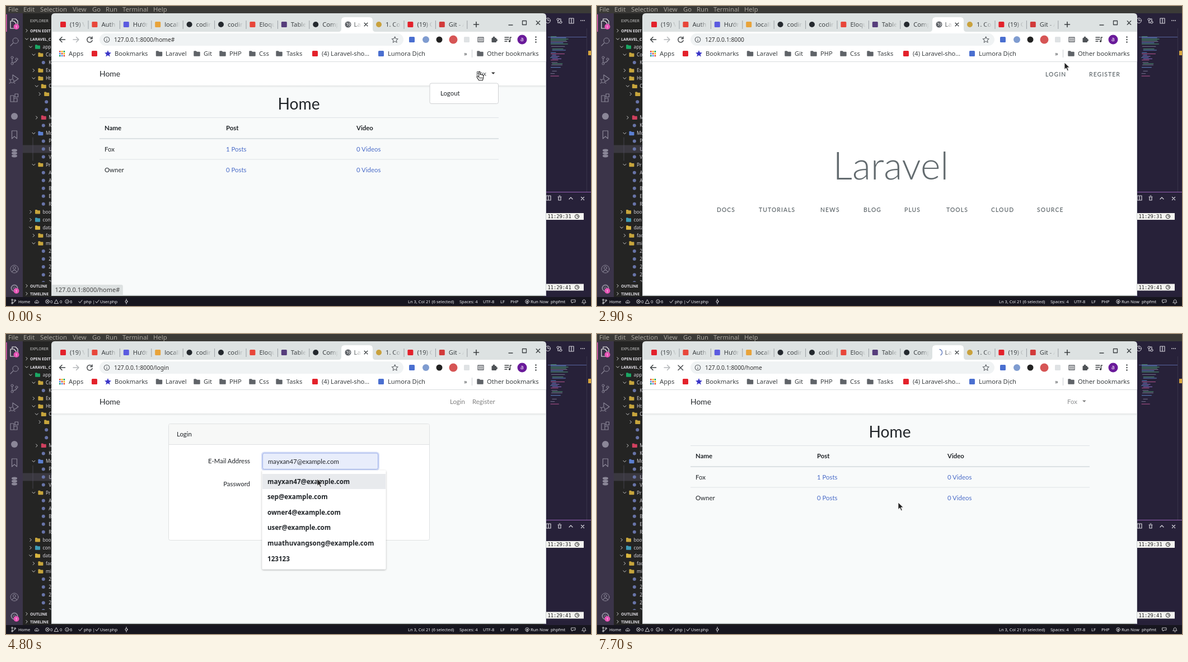
An HTML page that plays this animation: 1045x536 px, repeating every 8000 ms.

```html
<!DOCTYPE html>
<html lang="en">
<head>
<meta charset="utf-8">
<title>Login flow</title>
<style>
  html, body { margin: 0; width: 100%; height: 100%; overflow: hidden; background: #24242a; }
  svg { display: block; }
  #stage { width: 100vw; height: 100vh; }
  text { white-space: pre; font-family: "Noto Sans", "Open Sans", sans-serif; }
  .page text { font-family: Lato, "Open Sans", sans-serif; font-size: 11.4px; fill: #212529; }
  .page .link { fill: #4a6cc8; }
  .page .mute { fill: #808080; }
  .page .light { fill: #fff; }
  .page .caps { font-size: 10.4px; font-weight: 600; letter-spacing: 1.05px; fill: #636b6f; }
  .mono { font-family: "DejaVu Sans Mono", monospace; }
  .line { fill: none; stroke-linecap: round; stroke-linejoin: round; }
  .field { fill: #fff; stroke: #c9d0d6; stroke-width: 1; }
  .field.filled { fill: #e8edfb; }
  .field.focus { stroke: #a1b3ea; }
  .glow { fill: none; stroke: #4c6fd9; stroke-opacity: .25; stroke-width: 2.6; }
</style>
</head>
<body>
<svg id="stage" viewBox="0 0 1045 536">
  <defs>
    <linearGradient id="fade"><stop stop-color="#dde2e2" stop-opacity="0"/><stop offset="1" stop-color="#dde2e2"/></linearGradient>
    <linearGradient id="fadeOn"><stop stop-color="#fff" stop-opacity="0"/><stop offset="1" stop-color="#fff"/></linearGradient>
    <linearGradient id="drop" x2="0" y2="1"><stop stop-opacity=".09"/><stop offset="1" stop-opacity="0"/></linearGradient>
    <filter id="soft" x="-10%" y="-10%" width="120%" height="120%"><feDropShadow dx="0" dy="1" stdDeviation="1.5" flood-opacity=".35"/></filter>
  </defs>

  <g id="editor"></g>

  <g id="browser">
    <path d="M81 518V19q0-6 6-6H959q6 0 6 6V518z" fill="#dde2e2"/>
    <path d="M594 46q5 0 5-5V26q0-6 6-6H649q6 0 6 6V41q0 5 5 5z" fill="#fff"/>
    <rect x="82" y="46" width="883" height="53" fill="#fff"/>
    <rect x="167" y="49" width="543" height="22" rx="11" fill="#f0f3f4"/>
    <g id="chrome"></g>
    <text id="url" x="193" y="64" font-size="10.3" fill="#333"></text>
    <g id="globe"><circle cx="611" cy="33" r="5.5" fill="#5f6368"/>
      <path class="line" d="M608.500 30.500l2.500 1 .5 1.500-2 1.500M613 30l1.500 1.500-.5 3-1.500 1.500" stroke="#fff"/></g>
    <path id="spinner" class="line" d="M612 27.5a5.6 5.6 0 0 1 2 10.2" stroke="#6f86c4" stroke-width="1.5"/>
    <path id="reload" class="line" d="M153.4 57.5a4.7 4.7 0 1 0 .7 4M154 55v3.4h-3.4" stroke="#4a4d50" stroke-width="1.5"/>
    <path id="stop" class="line" d="M145 56l8.5 8.5M153.5 56l-8.5 8.5" stroke="#4a4d50" stroke-width="1.5"/>
  </g>

  <rect x="82" y="99" width="883" height="1" fill="#d8dcdf"/>
  <g class="page">
    <rect x="82" y="100" width="883" height="416" fill="#f8fafa"/>
    <g id="navbar">
      <rect x="82" y="142" width="883" height="4" fill="url(#drop)"/>
      <rect x="82" y="100" width="883" height="42" fill="#fff"/>
      <text x="167" y="126" style="font-size:13.9px">Home</text>
    </g>

    <g id="home">
      <g id="user"><text x="840" y="125">Fox</text><path d="M867 118.5h6.6l-3.3 3.4z"/></g>
      <text x="523" y="185" text-anchor="middle" style="font-size:28.2px">Home</text>
      <path d="M167 199.5H880M167 274H880" stroke="#dee2e6"/>
      <path d="M167 237H880" stroke="#d3d8dc" stroke-width="1.6"/>
      <g id="table"></g>
      <g id="menu">
        <rect x="757" y="138" width="122.5" height="36.5" rx="3" fill="#fff" stroke="#cfd1d3"/>
        <rect id="menuHover" x="757.5" y="144" width="121.5" height="24" fill="#4b6fd9"/>
        <text id="logout" x="776" y="160">Logout</text>
      </g>
    </g>

    <g id="welcome">
      <rect x="82" y="100" width="883" height="416" fill="#fff"/>
      <text x="525" y="309.5" text-anchor="middle" style="font-size:68px;font-weight:300;fill:#636b6f">Laravel</text>
      <g id="links"></g>
    </g>

    <g id="login">
      <text class="mute" x="793" y="125">Login</text><text class="mute" x="833" y="125">Register</text>
      <rect x="290.5" y="160.5" width="466" height="208" rx="3" fill="#fff" stroke="#dfe1e2"/>
      <path d="M291 197V164q0-3 3-3H753q3 0 3 3V197z" fill="#f7f8f7"/>
      <path d="M291 197.5H756" stroke="#dfe1e2"/>
      <text x="305" y="183">Login</text>
      <text x="436" y="231" text-anchor="end">E-Mail Address</text>
      <text x="436" y="272" text-anchor="end">Password</text>
      <rect id="mailGlow" class="glow" x="457.3" y="211.8" width="208.4" height="31" rx="4"/>
      <rect id="mail" class="field" x="458.5" y="213" width="206" height="28.5" rx="3"/>
      <text id="mailText" x="468" y="232">mayxan47@example.com</text>
      <rect id="passGlow" class="glow" x="457.3" y="252.7" width="208.4" height="31" rx="4"/>
      <rect id="pass" class="field" x="458.5" y="254" width="206" height="28.5" rx="3"/>
      <g id="dots"></g>
      <rect id="caret" width="1" height="15" fill="#222"/>
      <rect x="459" y="299" width="9" height="9" rx="1.5" fill="#fff" stroke="#767676"/>
      <text x="474" y="307">Remember Me</text>
      <rect id="buttonGlow" class="glow" x="457" y="323" width="50" height="31" rx="4"/>
      <rect x="458" y="324" width="48" height="29" rx="3" fill="#4b6fd9"/>
      <text class="light" x="468" y="342">Login</text>
      <text class="link" x="518.5" y="342">Forgot Your Password?</text>
      <g id="popup">
        <rect x="457.5" y="243.5" width="221" height="177" rx="2" fill="#fff" filter="url(#soft)"/>
        <rect id="choice" x="458" y="250" width="220" height="27" fill="#e8eaed"/>
      </g>
    </g>
  </g>

  <g id="status">
    <path id="bubble" fill="#dde1e1"/>
    <text id="statusText" x="87.5" y="510.5" font-size="11" fill="#444"></text>
  </g>
  <path d="M81.5 99V517.5H964.5V99" fill="none" stroke="#cfd4d6"/>

  <g id="hand"><path d="M-2.4-6.5q0-1.4 1.2-1.4t1.2 1.4v4q1.2-.8 2.1.3 1.2-.6 2 .5 1.7-.3 1.7 1.5v3.4L4.4 7.8H-2.2L-5.6 2.6q-.9-1.7.5-2.1 1.2-.2 2.7 1.6z" fill="#fff" stroke="#222" stroke-width="1.1"/><path d="M-.6 2v3M1.5 2v3M3.6 2v3" stroke="#222" stroke-width=".8"/></g>
  <path id="arrow" d="M0 0V12.4l3-2.7 2.3 5 2-.9-2.2-4.9h4.2z" fill="#222" stroke="#fff" stroke-width=".8"/>
  <path id="beam" class="line" d="M-2.5-6q2 0 2.5 1 .5-1 2.5-1M0-5V5M-2.5 6q2 0 2.5-1 .5 1 2.5 1" stroke="#222" stroke-width="1.2"/>
</svg>

<script>
const $ = id => document.getElementById(id);
const add = (id, ...parts) => $(id).insertAdjacentHTML('beforeend', parts.flat().join(''));
const text = (x, y, label, size, fill, extra = '') =>
  `<text x="${x}" y="${y}" font-size="${size}" fill="${fill}" ${extra}>${label}</text>`;
const line = (d, stroke, width = 1.2) => `<path class="line" d="${d}" stroke="${stroke}" stroke-width="${width}"/>`;
const rect = (x, y, w, h, fill, r = 0) => `<rect x="${x}" y="${y}" width="${w}" height="${h}" rx="${r}" fill="${fill}"/>`;
const dot = (x, y, r, fill) => `<circle cx="${x}" cy="${y}" r="${r}" fill="${fill}"/>`;
const ring = (x, y, r, stroke, w = 1) => `<circle class="line" cx="${x}" cy="${y}" r="${r}" stroke="${stroke}" stroke-width="${w}"/>`;
const folder = (x, y, s, fill) =>
  `<path transform="translate(${x} ${y}) scale(${s})" d="M-6-4q0-1 1-1h3.6l1.4 1.6H5q1 0 1 1V4q0 1-1 1H-5q-1 0-1-1z" fill="${fill}"/>`;
const cross = (x, y, r, color, w) => line(`M${x - r} ${y - r}l${2 * r} ${2 * r}M${x + r} ${y - r}l${-2 * r} ${2 * r}`, color, w);
const bold = 'font-weight="700"';
const sidebar = '#242423';

function drawEditor() {
  add('editor', rect(0, 0, 1045, 536, sidebar), rect(960, 13, 85, 508, '#272139'),
    rect(0, 0, 1045, 13, '#3b3a37'), rect(0, 13, 30, 508, '#3b3449'), rect(0, 520, 1045, 16, '#17161f'));
  const menu = { File: 4, Edit: 31, Selection: 61, View: 119, Go: 154, Run: 178, Terminal: 208, Help: 263 };
  add('editor', Object.entries(menu).map(([label, x]) => text(x, 10, label, 11.3, '#aaa69e')));

  // activity bar
  const dim = '#8b8798';
  add('editor', rect(0, 15, 1.5, 31, '#e05cb0'),
    line('M11 26V23h6l4 4v9h-3M8 27h6l4 4v9H8z', '#eee'),
    ring(17, 62, 5, dim), line('M13 66l-5 5', dim),
    ring(11, 92, 2, dim), ring(11, 103, 2, dim), ring(19, 95, 2, dim), line('M11 94v7M19 97q0 3-6 4', dim),
    line('M12 130v-7l10 7-7 5', dim), ring(11, 134, 3.3, dim), line('M6 131l2 1M6 138l2-1M16 138l-2-1', dim),
    line('M8 160h6v11H8zM14 165h6v6H8v-6M16 157h5.500v5.500H16z', dim),
    dot(15, 197, 6, dim), line('M10.500 223h9v14l-4.500-4-4.500 4z', dim),
    [258, 263, 268].map(y => `<ellipse cx="15" cy="${y}" rx="5" ry="2.4" fill="${dim}"/>`),
    ring(15, 470, 7, dim), ring(15, 468, 2.5, dim), line('M10.500 475q4.500-6 9 0', dim),
    ring(15, 504, 5.5, dim, 2), ring(15, 504, 2, dim),
    [37, 509].map(y => dot(18.5, y, 5, '#e653b5') + text(16.8, y + 2.6, '1', 6.5, '#fff')));

  // file tree: depth, marker (v open, > closed, . file), label, folder colour
  const gold = '#c7a53c';
  const tree = `0vapp#1ba764 1vCo 2.K 1>Ex 1vHt 2vC 3> 3. 3. 2>M#d0405e 2.K 1vMo#5b7fd0 2.P 2.U 2.V 1vPr
    2.A 2.A 2.B 2.E 2.R 0>boo 0>con#3e9bb5 0vdata#d9b640 1>fac 1vmi 2.2 2.2 2.2 2.2 2.2`.split(/\s+/);
  const chevron = (x, y, open) => line(open ? `M${x - 2.5} ${y - 1.2}l2.500 2.500 2.500-2.500` : `M${x - 1.2} ${y - 2.5}l2.500 2.500-2.500 2.500`, '#ccc', 1);
  add('editor', rect(30, 248.500, 51, 14, '#3a3840'), line('M48 235V276', '#55515f', .7));
  tree.forEach((entry, i) => {
    const [, depth, kind, label, color = gold] = entry.match(/(\d)(.)(\w*)(#\w+)?/);
    const y = 73 + 14.04 * i, x = 44 + 5.4 * depth;
    const isFile = kind === '.';
    add('editor', isFile ? dot(x + 12, y, 3, '#6874a8') : chevron(x, y, kind === 'v') + folder(x + 12.5, y, .75, color),
      text(x + 21.5, y + 3, label, 8.3, '#d4d2d8'));
  });
  add('editor', rect(30, 493, 51, 27, sidebar), text(43, 29, 'EXPLORER', 6.8, '#ccc'),
    [[44, 'OPEN EDIT'], [59, 'LARAVEL_C'], [500, 'OUTLINE'], [514, 'TIMELINE']].map(([y, label]) =>
      chevron(37, y, y === 59) + text(43, y + 2.8, label, 6.9, '#e4e2e8', bold)));

  // minimap and terminal
  let seed = 7;
  const random = () => (seed = seed * 16807 % 2147483647) / 2147483647;
  const inks = ['#8d6fc9', '#5f88c9', '#b5548f', '#4f9d76', '#777592'];
  for (let y = 52; y < 129; y += 2.2) {
    const header = y > 56 && y < 68;
    if (!header && random() < .4) continue;
    const indent = header ? 4 : 3 + 4 * random();
    const width = header ? 18 + 18 * random() : 6 + 20 * random();
    add('editor', rect(969 + indent, y, width, 1, inks[random() * 5 | 0]));
  }
  const pale = '#d8d6de';
  add('editor', rect(968, 55, 69, 1, '#5865a0'), rect(1037, 40, .6, 292, '#454055'), rect(1040, 80, 5, 8, '#d6a53c'),
    ring(968, 26, 4.5, pale), line('M968 23v3h3', pale),
    ring(986, 24, 2, pale), ring(991, 29, 2, pale), line('M986 26v4h3M991 27v-4h-3', pale),
    line('M1006 22h8v9h-8zM1010 22v9', pale), [1027, 1030, 1033].map(x => dot(x, 26, .9, pale)),
    rect(960, 332, 85, 1, '#9a62b8'),
    line('M965 339h8v8h-8zM969 339v8M986 341h6M987 341v6h4v-6M988 339h2', pale),
    line('M1006 345l3-3 3 3', pale), cross(1030, 344, 2.5, pale),
    [376, 502.5].map((y, i) => rect(960, y - 6, 72, 12, '#f3f3f0') +
      text(967.5, y + 3, `11:29:${i ? 41 : 31}`, 8.75, '#222', 'class="mono"') +
      ring(1020, y, 3.6, '#222') + line(`M1020 ${y - 2}v2h2`, '#222', .8)));

  // status bar
  const labels = { 22: 'Home', 79: '0', 96: '0', 114: '6', 139: 'php |', 168: 'User.php', 718: 'Ln 3, Col 21 (6 selected)',
    810: 'Spaces: 4', 852: 'UTF-8', 883: 'LF', 901: 'PHP', 937: 'Run Now', 973: 'phpfmt' };
  const white = '#efeff2';
  add('editor', Object.entries(labels).map(([x, label]) => text(x, 531, label, 7.5, white)),
    ring(11, 525, 1.3, white, .8), ring(11, 531, 1.3, white, .8), ring(16, 526, 1.3, white, .8), line('M11 527v3M16 528l-4 2', white, .8),
    line('M52 530.500h6q2-2-1-3.500-2-3-4 0-3 1-1 3.500zM55 531v-3', white, .8),
    ring(74, 528, 3.3, white, .8), cross(74, 528, 1.3, white, .8), line('M90 525l3.500 6.500h-7z', white, .8),
    ring(109, 528, 3.3, white, .8), line('M109 527.500v2', white, .8),
    line('M130 528l2 2.500 4-5M160 528l2 2.500 4-5', white, .9),
    ring(215, 528, 2, white, .9), line('M215 523.500v2M215 530.500v2', white, .9),
    ring(931, 528, 3.3, white, .8), dot(931, 528, 1.2, white), line('M931 528v4', white, .8),
    line('M1010 525h7v4h-4l-2 2v-2h-1zM1029 530h7l-1.300-2v-2q-2-3-4.400 0v2zM1031.500 532h2', white, .8));
}

function drawChrome() {
  const red = '#e3212b', ink = '#3c4043', gray = '#5f6368';
  const square = (x, y, fill, r = 1.5) => rect(x - 5, y - 5, 10, 10, fill, r);
  const tabs = [['(19) V', red], ['Auth', '#e8463a'], ['Hướn', '#5b5be0'], ['locall', '#e8a33a'], ['codin', '#24292e', 1],
    ['codin', '#24292e', 1], ['Eloqu', '#e8463a'], ['Table', '#563d7c'], ['Comp', '#24292e', 1], ['Lar'],
    ['1. Co', '#c9a13c', 1], ['(19) C', red], ['Git - A', '#d23a3a']];
  tabs.forEach(([label, color, round], i) => {
    const x = 102 + 56.4 * i, on = !color, width = on ? 13 : 27;
    add('chrome', on ? '' : square(x, 33, color, round ? 5 : 1.5),
      `<svg x="${x + 12}" y="20" width="${width}" height="24">${text(0, 17, label, 11.2, ink)}</svg>`,
      `<rect x="${x + width - 2}" y="22" width="14.500" height="22" fill="url(#${on ? 'fadeOn' : 'fade'})"/>`,
      [8, 9].includes(i) ? '' : rect(x + 44.5, 26, 1, 15, '#9a9fa3'));
  });
  add('chrome', cross(643, 33, 2.8, ink, 1.4), line('M835.500 33h9M840 28.500v9', ink, 1.6),
    line('M898 34h7M922.500 26.500h7v7h-7z', ink, 1.3), cross(950.5, 30, 3.2, ink, 1.4),
    line('M105.500 60H95.500M100 55.500L95.500 60l4.500 4.500', ink, 1.5), line('M120 60h10M125.500 55.500L130 60l-4.500 4.500', '#b4b7ba', 1.5),
    ring(180, 60, 4.8, gray, 1.1), line('M180 60v2.500M180 57.500v.1', gray, 1.2),
    line('M694.700 54.800l1.600 3.500 3.900.4-2.900 2.600.8 3.800-3.400-2-3.400 2 .8-3.800-2.900-2.600 3.900-.4z', gray, 1.1));

  // extensions
  add('chrome', square(725, 60, '#4a6fd0'), dot(750, 60, 6, '#7f9cd0'), dot(774, 60, 5.5, '#222'), dot(799, 60, 7.5, '#d65555'),
    square(823, 60, '#dfe2e4'), line('M843 56h10v8h-10zM845.500 58v4M848 58v4M850.500 58v4', gray, 1.3),
    rect(867.500, 57, 8.5, 8, '#4f5357', 1), dot(871.500, 56.500, 2, '#4f5357'), dot(876, 61, 2, '#4f5357'),
    line('M891 56h7M891 59.500h7M891 63h4M900.500 63V56h2', ink, 1.4), dot(899.500, 63, 1.8, ink),
    dot(922, 60, 8.5, '#6a1b9a'), text(919, 63.2, 'a', 10, '#fff'), [55.5, 60, 64.5].map(y => dot(946.5, y, 1.2, ink)));

  // bookmarks
  const hues = ['#db4437', '#f4b400', '#0f9d58', '#4285f4'];
  for (let i = 0; i < 9; i++) add('chrome', rect(95 + i % 3 * 3.8, 80 + (i / 3 | 0) * 3.8, 2.6, 2.6, hues[i % 4]));
  const marks = { 112: 'Apps', 194: 'Bookmarks', 285: 'Laravel', 353: 'Git', 399: 'PHP', 452: 'Css', 501: 'Tasks',
    564: '(4) Laravel-sho…', 682: 'Lumora Dịch', 818: '»', 859: 'Other bookmarks' };
  add('chrome', Object.entries(marks).map(([x, label]) => text(x, 89, label, 11.2, ink)),
    [273.5, 341, 387, 440, 488, 847].map(x => folder(x, 85, .95, gray)),
    square(158, 85, red), square(552, 85, red), square(670, 85, '#4a6fd0'), rect(832, 78, 1, 14, '#c8ccd0'),
    '<path d="M182 79l1.700 4 4.300.4-3.300 2.800 1 4.200-3.700-2.300-3.700 2.300 1-4.200-3.300-2.800 4.300-.4z" fill="#3a35c8"/>');
}

function drawPages() {
  const label = (x, y, words, attrs = '') => `<text x="${x}" y="${y}" ${attrs}>${words}</text>`;
  const rows = [['Name', 'Post', 'Video'], ['Fox', '1 Posts', '0 Videos'], ['Owner', '0 Posts', '0 Videos']];
  rows.forEach((row, r) => row.forEach((cell, c) =>
    add('table', label([176, 393, 626][c], [221.5, 259.5, 296.5][r], cell, r ? (c ? 'class="link"' : '') : bold))));
  const links = { 214: 'DOCS', 289: 'TUTORIALS', 399: 'NEWS', 476: 'BLOG', 549: 'PLUS', 624: 'TOOLS', 704: 'CLOUD', 786: 'SOURCE' };
  add('links', label(801, 126, 'LOGIN', 'class="caps"'), label(879, 126, 'REGISTER', 'class="caps"'),
    Object.entries(links).map(([x, name]) => label(x, 367.5, name, 'class="caps"')));
  const saved = ['mayxan47@example.com', 'sep@example.com', 'owner4@example.com', 'user@example.com', 'muathuvangsong@example.com', '123123'];
  add('popup', saved.map((entry, i) => label(467, 267.5 + 27.6 * i, entry,
    'style="font:600 11.6px Noto Sans,Open Sans,sans-serif"')));
  add('dots', keyTimes.map((_, i) => dot(471.7 + 5.75 * i, 269, 2.1, '#333')));
}

const keyTimes = [5400, 5500, 5600, 6000, 6100, 6500, 6600];
// pointer moves: start, end, x, y, shape
const moves = [
  [0, 1, 847, 125, 'hand'], [600, 800, 823, 163, 'hand'], [1900, 2100, 757, 160, 'arrow'], [2200, 2300, 732, 161, 'arrow'],
  [2500, 2900, 835, 101, 'arrow'], [3000, 3200, 820, 125, 'hand'], [3600, 3900, 600, 200, 'arrow'], [3900, 4200, 569, 226, 'beam'],
  [4500, 4800, 556, 259, 'arrow'], [5000, 5200, 565, 277, 'beam'], [6800, 7100, 487, 342, 'hand'], [7300, 7600, 538, 301, 'arrow']];

function pointer(t) {
  let [, , x, y, shape] = moves[0];
  for (const [start, end, toX, toY, next] of moves.slice(1)) {
    if (t <= start) break;
    const k = Math.min(1, (t - start) / (end - start));
    x += (toX - x) * k;
    y += (toY - y) * k;
    shape = next;
  }
  return { x, y, shape };
}

const show = (id, on) => { $(id).style.display = on ? '' : 'none'; };
const host = '127.0.0.1:8000';

function render(t) {
  const within = (from, to) => t >= from && t < to;
  const page = t < 1700 ? 'home' : t < 3700 ? 'welcome' : t < 7700 ? 'login' : 'home';
  for (const id of ['home', 'welcome', 'login']) show(id, id === page);
  show('navbar', page !== 'welcome');
  $('url').textContent = host + (t < 1700 ? '/home#' : page === 'welcome' ? '' : '/' + page);

  const loading = within(1700, 2000) || within(3500, 3900) || t >= 7300;
  show('spinner', loading);
  show('stop', loading);
  show('globe', !loading);
  show('reload', !loading);
  $('spinner').setAttribute('transform', `rotate(${(t - 7700) * .36} 611 33)`);

  const path = t < 1100 ? '/home#' : t < 2000 ? '/logout' : within(3200, 3800) ? '/login' : '';
  show('status', path);
  $('statusText').textContent = host + path;
  if (path) $('bubble').setAttribute('d', `M82 516V498H${90 + $('statusText').getComputedTextLength()}q3 0 3 3V516z`);

  const hover = within(800, 1700);
  show('menu', t < 1700);
  show('menuHover', hover);
  $('logout').setAttribute('class', hover ? 'light' : '');
  $('user').setAttribute('opacity', t < 1700 ? .8 : .5);

  const mailFocus = within(4200, 5300), passFocus = t >= 5300 && t < 7200, filled = t >= 4800;
  const typed = keyTimes.filter(time => time <= t).length;
  show('mailGlow', mailFocus);
  show('passGlow', passFocus);
  show('buttonGlow', t >= 7200);
  show('mailText', filled);
  $('mail').setAttribute('class', `field ${filled ? 'filled' : ''} ${mailFocus ? 'focus' : ''}`);
  $('pass').setAttribute('class', `field ${passFocus ? 'focus' : ''}`);
  show('popup', within(4300, 5000));
  show('choice', t >= 4700);
  [...$('dots').children].forEach((bullet, i) => bullet.setAttribute('opacity', i < typed ? 1 : 0));
  const inPassword = t >= 5200;
  show('caret', within(4200, 4800) || within(5200, 7200));
  $('caret').setAttribute('x', 468 + (typed ? .8 + 5.75 * typed : 0));
  $('caret').setAttribute('y', inPassword ? 261 : 220);

  const { x, y, shape } = pointer(t);
  for (const id of ['hand', 'arrow', 'beam']) show(id, id === shape);
  $(shape).setAttribute('transform', `translate(${x} ${y})`);
}

drawEditor();
drawChrome();
drawPages();

// The screen refreshes ten times a second.
function tick(now) {
  render(Math.floor(now % 8000 / 100) * 100);
  requestAnimationFrame(tick);
}
render(0);
requestAnimationFrame(tick);
</script>
</body>
</html>
```
